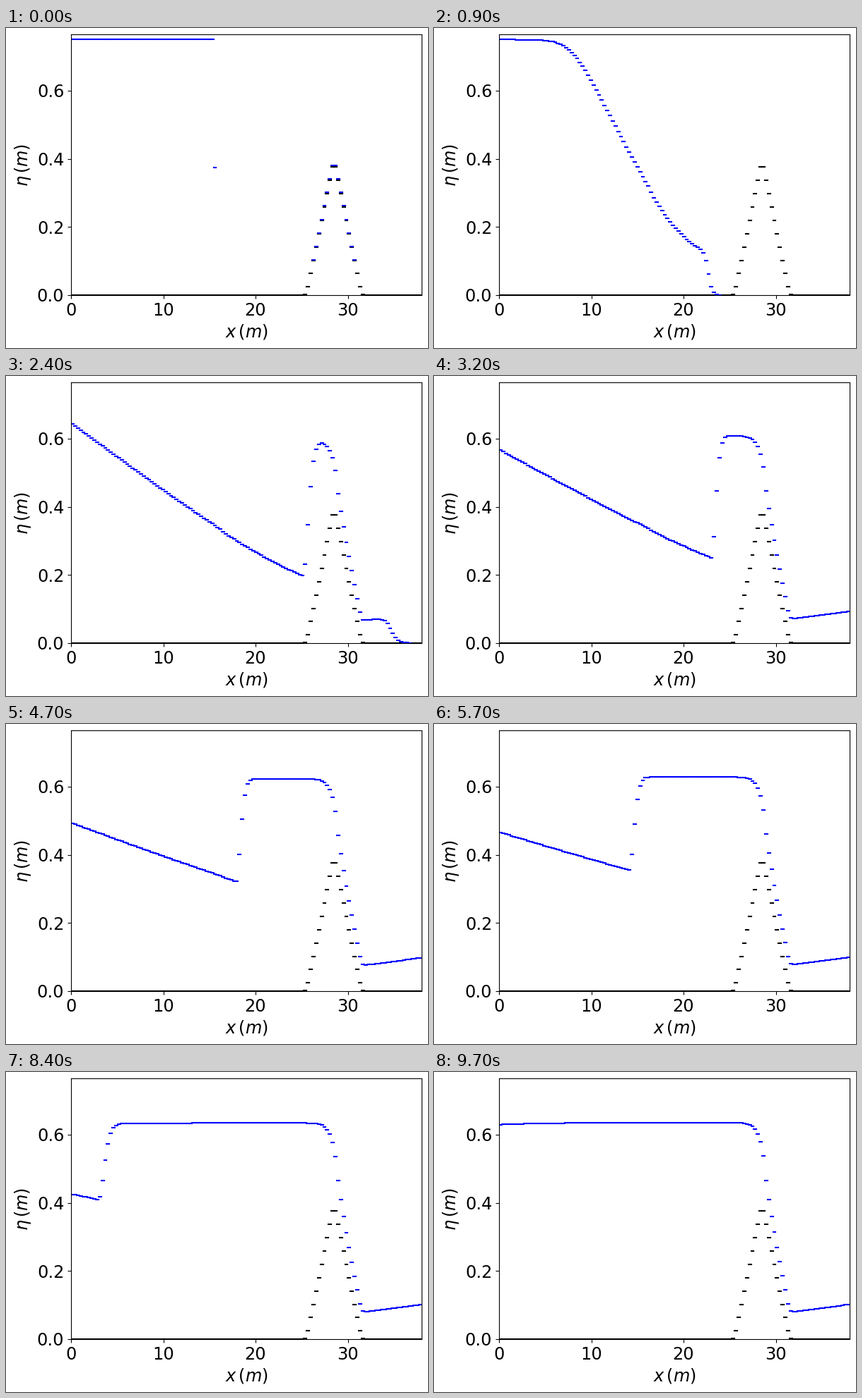
Recreate the animation shown at these times as a matplotlib script. Size 597x454 px, loop 9800 ms.

```python
import numpy as np
import matplotlib.pyplot as plt
from matplotlib.animation import FuncAnimation

FRAMES, STEP_MS = 98, 100
CELLS, LENGTH, DAM, DEPTH = 128, 38.0, 15.5, 0.75
CREST, LEVEL = 28.5, 0.6365

plt.rcParams["font.family"] = "DejaVu Sans"
plt.rcParams["font.size"] = 17.28

nodes = np.linspace(0, LENGTH, CELLS + 1)


def cell_mean(values):
    return (values[:-1] + values[1:]) / 2


x = cell_mean(nodes)
hill = cell_mean(np.maximum(0, 0.4 * (1 - np.abs(nodes - CREST) / 3)))
bed = 0.987 * hill


def sigmoid(z):
    return 1 / (1 + np.exp(-np.clip(z, -60, 60)))


def settled():
    """Final steady level: pool, drop over the crest, thin outflow."""
    pool = (LEVEL - 0.006 * np.exp(-x / 5)
            - 0.075 * np.exp(np.minimum(x - CREST, 0.3) / 0.55))
    outflow = (bed + 0.078 + 0.052 * np.exp((28.94 - x) / 0.8)
               + 0.0037 * np.maximum(x - 31.5, 0))
    return np.where(x < 28.8, pool, outflow)


def fan(n):
    """Self-similar dam-break wave, rounded off below the initial depth."""
    s = (x - DAM) / n
    h = 0.1 + 0.114 * np.logaddexp(0, (0.47 - s) / 0.235)
    h += 0.12 / (n + 4) * sigmoid(8 * (16.5 - x))
    w = min(0.08, 0.16 / np.sqrt(n))
    return -w * np.logaddexp(-DEPTH / w, -h / w)


def bore(n):
    """Share of the upper pool in each cell, rising from the bore's foot."""
    foot = 25.2 - 0.1883 * max(n - 24, 0) ** 1.165
    width = 0.545 + 0.0058 * (n - 32) + 1.15 * np.exp((16 - n) / 5)
    return 1 - np.exp(-(np.maximum(x - foot, 0) / width) ** 1.68)


def surface(n):
    """Water level per cell; NaN where the ground is dry."""
    if n == 0:
        still = cell_mean(np.where(nodes < DAM, DEPTH, 0))
        level = np.maximum(still, hill)
        return np.where((still > 0) | (hill > 0.08), level, np.nan)

    lag = 0.028 * np.exp((32 - n) / 20)
    upper = settled() - lag * (0.32 + 0.68 * sigmoid(2 * (29 - x)))
    lower = fan(n)
    level = lower + (upper - lower) * bore(n)

    # Wet front, sharp at first and then spreading
    gain = 2.8 * max(1, 16 / (n + 1))
    ahead = gain * (x - DAM - 0.8 * n)
    level = bed + np.maximum(level - bed, 0) * sigmoid(-ahead)
    return np.where(ahead < 6, level, np.nan)


def dashes(level):
    """One polyline with a gap after every cell."""
    gap = np.full(CELLS, np.nan)
    xs = np.column_stack([nodes[:-1], nodes[1:], gap])
    ys = np.column_stack([level, level, gap])
    return xs.ravel(), ys.ravel()


fig = plt.figure(figsize=(5.97, 4.54), dpi=100, facecolor="white")
ax = fig.add_axes([92 / 597, 75.2 / 454, 496 / 597, 369.6 / 454])
ax.set_xlim(0, LENGTH)
ax.set_ylim(0, 1.02 * DEPTH)
ax.set_xticks(range(0, 40, 10))
ax.set_yticks(np.arange(4) * 0.2)
ax.set_xlabel(r"$x\,(m)$")
ax.set_ylabel(r"$\eta\,(m)$")

style = dict(lw=1.5, solid_capstyle="projecting")
ax.plot(*dashes(bed), color="black", **style)
water, = ax.plot(*dashes(surface(0)), color="blue", **style)


def update(n):
    water.set_data(*dashes(surface(n)))
    return water,


anim = FuncAnimation(fig, update, frames=FRAMES, interval=STEP_MS,
                     repeat=True, repeat_delay=0, blit=False)
plt.show()
```
